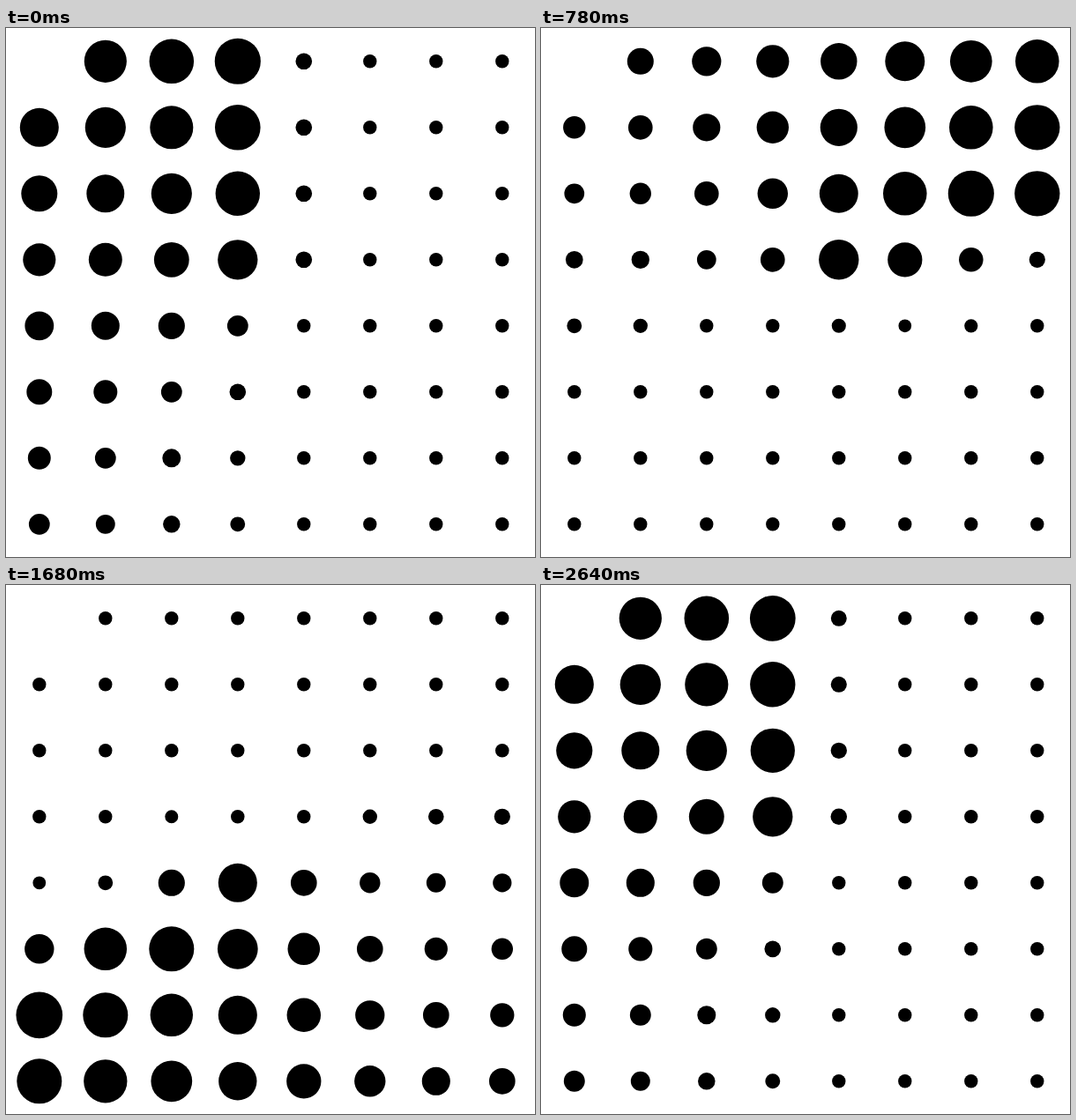
An HTML page for the animation above (2.67 s loop, 600 by 600 pixels).

```html
<!DOCTYPE html>
<html lang="en">
<head>
<meta charset="utf-8">
<title>Dot sweep</title>
<style>
html, body { margin: 0; width: 100%; height: 100%; overflow: hidden; background: #fff; }
svg { display: block; width: 100vw; height: 100vh; }
</style>
</head>
<body>
<svg id="stage" viewBox="0 0 600 600"></svg>
<script>
const LOOP = 2670, STEP = 30, TURN = 2 * Math.PI;
const CELL = 75, COUNT = 8, MID = 300, SHIFT = 0.3;
const BASE = 7.7, GROWTH = 19.6;

const clamp = v => Math.min(1, Math.max(0, v));
const smooth = v => v * v * (3 - 2 * v);

const stage = document.getElementById('stage');
const dots = [];
for (let row = 0; row < COUNT; row++) {
  for (let col = 0; col < COUNT; col++) {
    if (row + col === 0) continue; // the corner stays empty
    const cx = (col + 0.5) * CELL, cy = (row + 0.5) * CELL;
    const el = document.createElementNS('http://www.w3.org/2000/svg', 'circle');
    el.setAttribute('cx', cx + SHIFT);
    el.setAttribute('cy', cy + SHIFT);
    stage.appendChild(el);
    dots.push({ el, x: cx - MID, y: cy - MID });
  }
}

// The trail fades over half a turn behind the hand, slightly S-shaped.
function trail(lag) {
  const u = clamp(1 - lag / Math.PI);
  return GROWTH * (u - 0.035 * Math.sin(TURN * u));
}

function radius(x, y, hand) {
  const sin = Math.sin(hand), cos = Math.cos(hand);
  const along = x * sin - y * cos;
  const ahead = x * cos + y * sin;
  const lag = Math.atan2(-ahead, along);
  if (along <= 0) return BASE + trail(lag < 0 ? lag + TURN : lag);
  // Soft leading edge with a slight dip in front of it.
  const edge = smooth(clamp((56 - ahead) / 104));
  const dip = 0.35 * Math.exp(-(((ahead - 68) / 18) ** 2));
  return BASE + trail(Math.max(0, lag)) * edge - dip;
}

function draw(time) {
  const tick = Math.floor((time % LOOP) / STEP) * STEP;
  const t = tick < 2 * STEP ? 0 : tick;
  const hand = TURN * smooth((t + 4) / 2700);
  for (const { el, x, y } of dots) el.setAttribute('r', radius(x, y, hand).toFixed(2));
}

const start = performance.now();
function loop() {
  draw(performance.now() - start);
  requestAnimationFrame(loop);
}
loop();
</script>
</body>
</html>
```
